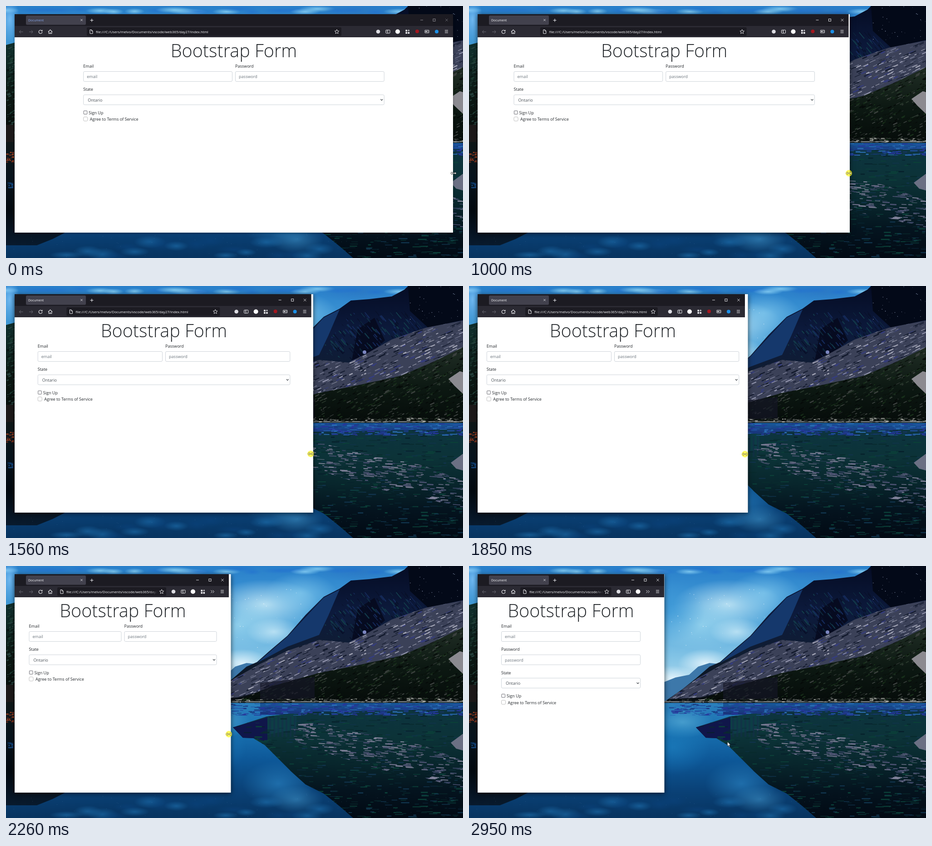
Write an HTML page with a canvas that moves like this. It is 1007 by 556 pixels and loops after 3030 ms.

```html
<!DOCTYPE html>
<html lang="en">
<head>
<meta charset="utf-8">
<title>Responsive form</title>
<style>
html, body { margin: 0; width: 100%; height: 100%; overflow: hidden; background: #0b3a66; }
canvas { display: block; width: 1007px; height: 556px; }
</style>
</head>
<body>
<canvas id="stage" width="1007" height="556"></canvas>
<script>
const W = 1007, H = 556, LOOP = 3030;
const LEFT = 19, TOP = 18, BOTTOM = 500, SCALE = 0.594;
const FONT = '"Open Sans", "Noto Sans", sans-serif';
const URL_TEXT = 'file:///C:/Users/melvo/Documents/vscode/web365/day27/index.html';
let ctx = document.getElementById('stage').getContext('2d');

const TICKS = [[50, 0], [390, 5], [860, 12], [930, 13], [1420, 20], [1490, 21],
  [1990, 28], [2060, 29], [2540, 36], [2750, 39], [2950, 42], [3030, 43]];
// [tick, cursor x, cursor y, toolbar edge, window edge, page edge]
const DRAG = [
  [0, 987, 369, 985, 985, 985],
  [5, 988, 369, 985, 985, 985],
  [9, 960, 369, 969, 972, 971],
  [12, 890, 369, 894, 897, 899],
  [14, 837, 369, 836.5, 839, 841.5],
  [18, 754, 369, 761, 761.5, 765],
  [20, 703, 370, 705, 708, 708],
  [26, 608, 371, 608, 614.5, 615],
  [28, 560, 371, 562, 566, 566],
  [32, 491, 371, 491, 495.5, 496],
  [36, 435, 370, 437, 441, 441],
  [38, 432, 369, 430, 430.5, 430]];

function sample(rows, x) {
  if (x <= rows[0][0]) return rows[0];
  for (let i = 1; i < rows.length; i++) {
    const a = rows[i - 1], b = rows[i];
    if (x < b[0]) {
      const u = (x - a[0]) / (b[0] - a[0]);
      return a.map((v, j) => v + (b[j] - v) * u);
    }
  }
  return rows[rows.length - 1];
}

let seed = 11;
const rand = () => (seed = (seed * 16807) % 2147483647) / 2147483647;

// ---- drawing helpers ----
function path(points, close) {
  ctx.beginPath();
  for (let i = 0; i < points.length; i += 2) ctx.lineTo(points[i], points[i + 1]);
  if (close) ctx.closePath();
}
function poly(points, fill) {
  path(points, true);
  ctx.fillStyle = fill;
  ctx.fill();
}
function line(points, color, width = 1, close = false) {
  path(points, close);
  ctx.strokeStyle = color;
  ctx.lineWidth = width;
  ctx.stroke();
}
function rect(x, y, w, h, fill) {
  ctx.fillStyle = fill;
  ctx.fillRect(x, y, w, h);
}
function box(x, y, w, h, r, fill, stroke, width = 1) {
  ctx.beginPath();
  ctx.roundRect(x, y, w, h, r);
  if (fill) { ctx.fillStyle = fill; ctx.fill(); }
  if (stroke) { ctx.strokeStyle = stroke; ctx.lineWidth = width; ctx.stroke(); }
}
function disc(x, y, r, fill) {
  ctx.beginPath();
  ctx.arc(x, y, r, 0, 7);
  ctx.fillStyle = fill;
  ctx.fill();
}
function text(str, x, y, size, color, weight = 400, align = 'left') {
  ctx.font = `${weight} ${size}px ${FONT}`;
  ctx.textAlign = align;
  ctx.fillStyle = color;
  ctx.fillText(str, x, y);
}
function vertical(y0, y1, ...colors) {
  const g = ctx.createLinearGradient(0, y0, 0, y1);
  colors.forEach((c, i) => g.addColorStop(i / (colors.length - 1), c));
  return g;
}
function puff(x, y, rx, ry, color) {
  ctx.save();
  ctx.translate(x, y);
  ctx.scale(rx, ry);
  const g = ctx.createRadialGradient(0, 0, 0, 0, 0, 1);
  g.addColorStop(0, color);
  g.addColorStop(1, color.slice(0, 7) + '00');
  disc(0, 0, 1, g);
  ctx.restore();
}
// Scatter short strokes inside an outline
function speckle(outline, colors, count, slope, length) {
  const xs = outline.filter((_, i) => i % 2 === 0), ys = outline.filter((_, i) => i % 2);
  const x0 = Math.min(...xs), y0 = Math.min(...ys);
  const w = Math.max(...xs) - x0, h = Math.max(...ys) - y0;
  ctx.save();
  path(outline, true);
  ctx.clip();
  for (let i = 0; i < count; i++) {
    const x = x0 + rand() * w, y = y0 + rand() * h, l = length * (0.4 + rand());
    line([x, y, x + l, y + l * slope], colors[Math.floor(rand() * colors.length)], 0.7 + rand() * 2);
  }
  ctx.restore();
}

// ---- wallpaper ----
function paintSky() {
  rect(0, 0, W, 303, vertical(0, 303, '#287fca', '#479fd8', '#83c4e6', '#c9e6f3'));
  [[570, 85, 120, 55, '#d9f4fbc0'], [510, 130, 110, 55, '#a6def2b0'], [520, 215, 60, 32, '#eefaffd0'],
   [450, 250, 60, 30, '#f2fbffd0'], [650, 60, 80, 45, '#8dd2f2a0'], [590, 145, 60, 30, '#d8f2fbb0'],
   [440, 100, 80, 70, '#3c98d8a0'], [780, 12, 100, 24, '#2a76c4c0']].forEach(p => puff(...p));
  for (let x = 0; x < 880; x += 38)
    puff(x + rand() * 30, 6 + rand() * 8, 22 + rand() * 22, 7, rand() < 0.4 ? '#9fe2fcb0' : '#2372cfb0');
  puff(8, 30, 22, 50, '#7fc4f8d0');
  for (let i = 0; i < 45; i++) disc(440 + rand() * 240, 50 + rand() * 130, 0.3 + rand() * 0.6, '#ffffffb0');
}
function paintMountains() {
  poly([430, 300, 430, 256, 455, 246, 485, 240, 505, 222, 530, 214, 560, 217, 560, 300], '#3d78aa');
  const ridge = [430, 300, 470, 272, 500, 248, 530, 222, 553, 212, 580, 188, 620, 154, 660, 108,
    700, 68, 735, 50, 760, 32, 800, 29, 850, 23, 878, 8, 886, 0, W, 0, W, 303, 430, 303];
  poly(ridge, vertical(0, 300, '#050c24', '#0c1a3c', '#101d31', '#070d12'));
  poly([553, 214, 620, 156, 700, 70, 735, 52, 710, 110, 690, 152, 620, 178], '#15386c');
  poly([886, 0, W, 0, W, 75, 930, 92, 890, 55], '#030918');
  poly([775, 95, 812, 70, 835, 120, 800, 152, 762, 164], '#060b20');
  speckle([690, 145, 760, 60, 870, 50, 930, 92, 760, 165], ['#152a5a', '#081028', '#123a4a'], 240, 1.2, 9);
  for (let i = 0; i < 30; i++) disc(890 + rand() * 117, rand() * 85, 0.35 + rand() * 0.4, '#b9c9e8');
  const rock = [440, 294, 500, 250, 560, 216, 620, 187, 690, 163, 755, 169, 800, 146, 850, 118,
    925, 92, W, 76, W, 142, 930, 178, 870, 205, 780, 222, 680, 242, 590, 270, 510, 290];
  poly(rock, '#3b4158');
  speckle(rock, ['#8d90a8', '#6b7088', '#a6a8b8', '#1a2136', '#10182a', '#343c80', '#4a506a'], 1800, -0.45, 10);
  const slope = [500, 300, 590, 264, 690, 236, 780, 218, 870, 198, 940, 168, W, 135, W, 303, 500, 303];
  poly(slope, vertical(150, 300, '#1d2a22', '#0c1812', '#060c0a'));
  speckle(slope, ['#18301a', '#0a120c', '#27362a', '#050908', '#3c413f'], 1300, -0.5, 7);
  poly([975, 205, 1000, 188, W, 190, W, 238, 988, 220], '#8b8a90');
  poly([560, 258, 680, 245, 680, 292, 560, 296], '#151726b0');
  disc(790, 146, 4, '#7c86c0');
  rect(430, 298, 577, 3, '#6a7074');
  speckle([430, 295, W, 290, W, 301, 430, 301], ['#a0a29c', '#3c4140', '#1a211e'], 300, 0, 6);
}
function paintLake() {
  rect(0, 302, W, 254, vertical(302, 556, '#2b80bc', '#1870b0', '#0d5797', '#0a4278', '#07335f'));
  rect(560, 302, 447, 26, vertical(302, 328, '#175a9a', '#1a2f78'));
  [[470, 345, 70, 35, '#5eb4dca0'], [450, 400, 80, 60, '#1d80c0a0'], [600, 480, 80, 50, '#2a84c4a0'],
   [640, 515, 60, 30, '#3e92c890']].forEach(p => puff(...p));
  for (let x = 130; x < 680; x += 30)
    puff(x + rand() * 25, 512 + rand() * 40, 20 + rand() * 24, 8 + rand() * 8, rand() < 0.6 ? '#1f74b490' : '#0a427c90');
  const mirror = [500, 356, 575, 332, 660, 322, W, 316, W, 556, 765, 556, 735, 530, 700, 502,
    660, 482, 630, 455, 600, 425, 570, 395, 545, 380, 522, 379];
  poly(mirror, vertical(316, 556, '#0d3440', '#0c3338', '#08262c', '#04131e', '#020a14'));
  poly([500, 356, 576, 334, 576, 388, 550, 380, 522, 379], '#10164a');
  poly([576, 332, 640, 324, 640, 360, 576, 372], '#0d3d45');
  for (let i = 0; i < 7; i++) rect(580 + i * 9, 332, 4, 45, '#152f4a90');
  speckle(mirror, ['#0b4038', '#082a2d', '#06202b', '#10334b'], 650, 0, 14);
  const glint = [620, 350, 690, 346, 800, 370, 920, 396, W, 430, W, 492, 930, 470, 830, 450, 730, 420, 640, 388];
  speckle(glint, ['#686b84', '#4c5272', '#80829a', '#0c2b35', '#31405c'], 850, 0.06, 13);
  poly([980, 390, W, 370, W, 407, 992, 403], '#6b7084');
  speckle([440, 303, W, 303, W, 330, 440, 330], ['#2050a0', '#2c70b8', '#183a80', '#27349a'], 420, 0, 12);
}
function paintShore() {
  poly([0, 86, 22, 80, 22, 310, 0, 310], vertical(80, 310, '#10302e', '#0c1914', '#050908'));
  poly([0, 300, 22, 300, 22, 500, 130, 500, 103, 514, 68, 528, 0, 528], vertical(300, 528, '#0e1718', '#07131c', '#03090f', '#081a2d'));
  speckle([0, 88, 20, 84, 20, 300, 0, 300], ['#1c3d32', '#07100e', '#27443f'], 130, -0.4, 6);
  rect(0, 262, 18, 38, '#1c1919');
  speckle([0, 320, 18, 320, 18, 346, 0, 346], ['#b34822', '#6d2c1e', '#2b2020'], 45, 0, 4);
  speckle([0, 388, 16, 388, 16, 402, 0, 402], ['#174f8c', '#0b3158'], 22, 0, 5);
  for (let i = 0; i < 55; i++) disc(rand() * 1000, 502 + rand() * 52, 0.4, '#8fb9dd90');
}
function makeWallpaper() {
  const canvas = document.createElement('canvas'), screen = ctx;
  canvas.width = W;
  canvas.height = H;
  ctx = canvas.getContext('2d');
  paintSky();
  paintMountains();
  paintLake();
  paintShore();
  ctx = screen;
  return canvas;
}

// ---- browser ----
const LIGHT = '#f4f4f8', DIM = '#6b6a74';
function cross(x, y, r, color) {
  line([x - r, y - r, x + r, y + r], color, 0.8);
  line([x - r, y + r, x + r, y - r], color, 0.8);
}
function arrow(x, dir) {
  line([x - 4 * dir, 57, x + 4 * dir, 57], DIM);
  line([x + dir, 53.5, x + 4 * dir, 57, x + dir, 60.5], DIM);
}
const toolIcons = [
  x => disc(x, 56.5, 4.3, '#dcdce2'),
  x => {
    box(x - 4.5, 53, 9, 7, 1, null, LIGHT);
    line([x - 0.5, 53, x - 0.5, 60], LIGHT);
    line([x - 3, 55.5, x - 1.5, 55.5], LIGHT, 0.8);
  },
  x => disc(x, 56.5, 5, '#ffffff'),
  x => {
    [[-4, -4], [-4, 1], [1, 1]].forEach(([dx, dy]) => rect(x + dx, 56.5 + dy, 3.6, 3.6, LIGHT));
    line([x + 2.8, 52, x + 2.8, 56], LIGHT);
    line([x + 0.8, 54, x + 4.8, 54], LIGHT);
  },
  x => disc(x, 56, 4, '#a3161e'),
  x => {
    box(x - 4.5, 53.3, 9, 6, 0.5, null, LIGHT, 0.9);
    rect(x - 3, 55, 3, 2.5, LIGHT);
    line([x + 1, 55.3, x + 3.5, 55.3], LIGHT, 0.7);
    line([x + 1, 57.3, x + 3.5, 57.3], LIGHT, 0.7);
  },
  x => disc(x, 56.5, 4, '#1c8fe6')];

function drawTabs(edge, active) {
  rect(LEFT, TOP, edge - LEFT, 26, '#1c1b22');
  box(44, 21, 132, 20.5, 2.5, '#42414d');
  text('Document', 49, 33.8, 7, active ? '#fbfbfe' : '#86a6ec');
  cross(166.5, 31, 2.2, LIGHT);
  line([185.5, 31.5, 192.5, 31.5], LIGHT);
  line([189, 28, 189, 35], LIGHT);
  const color = active ? LIGHT : '#98979e';
  line([edge - 72, 31, edge - 66, 31], color, 0.9);
  ctx.strokeRect(edge - 44, 28.5, 5, 5);
  cross(edge - 14, 31, 2.8, active ? LIGHT : '#77767e');
}
function drawToolbar(edge) {
  rect(LEFT, 44, edge - LEFT, 25, '#2b2a33');
  arrow(33.5, -1);
  arrow(55, 1);
  ctx.beginPath();
  ctx.arc(76, 57, 3.8, 0.1, 5.4);
  ctx.strokeStyle = LIGHT;
  ctx.lineWidth = 1.1;
  ctx.stroke();
  poly([77, 55.8, 80.4, 55.8, 80.4, 52.2], LIGHT);
  line([93, 57, 97.5, 52.5, 102, 57], LIGHT, 1.1);
  line([94.3, 56.5, 94.3, 60.8, 100.7, 60.8, 100.7, 56.5], LIGHT, 1.1);
  line([97.5, 58, 97.5, 60.5], LIGHT, 1.4);

  const count = edge > 540 ? 7 : edge > 520 ? 5 : edge > 488 ? 4 : 3;
  const slots = count < 7 ? count + 1 : count;
  const slot = i => edge - 14.5 - 21.5 * (slots - i);
  for (let i = 0; i < count; i++) toolIcons[i](slot(i));
  if (count < 7) {
    const x = slot(count);
    [-3.5, 0.5].forEach(d => line([x + d, 53.5, x + d + 3, 56.5, x + d, 59.5], LIGHT));
  }
  [53.5, 56.3, 59.1].forEach(y => line([edge - 18, y, edge - 11, y], LIGHT, 0.9));
  drawAddress(Math.max(113, 178 - (985 - edge) / 7), slot(0) - 11);
}
function drawAddress(left, limit) {
  const right = limit - (left - 108);
  box(left, 47, right - left, 19, 2.5, '#1c1b22');
  const x = left + 7;
  line([x, 52.5, x + 3.5, 52.5, x + 6, 55, x + 6, 60.8, x, 60.8], LIGHT, 1, true);
  line([x + 3.3, 52.5, x + 3.3, 55.3, x + 6, 55.3], LIGHT, 0.8);
  ctx.save();
  ctx.beginPath();
  ctx.rect(left, 47, right - left - 19, 19);
  ctx.clip();
  text(URL_TEXT, left + 20, 59.6, 7.8, '#fbfbfe');
  if (right - left < 285) {
    const g = ctx.createLinearGradient(right - 36, 0, right - 19, 0);
    g.addColorStop(0, '#1c1b2200');
    g.addColorStop(1, '#1c1b22');
    rect(right - 36, 48, 18, 17, g);
  }
  ctx.restore();
  const star = [];
  for (let i = 0; i < 10; i++) {
    const a = i * Math.PI / 5 - Math.PI / 2, r = i % 2 ? 2.3 : 5;
    star.push(right - 10 + r * Math.cos(a), 56.8 + r * Math.sin(a));
  }
  line(star, LIGHT, 0.9, true);
}

// ---- page ----
const INK = '#212529';
function field(label, hint, x, y, w, inset = 8, color = '#6c757d') {
  text(label, x, y + 3, 9.05, INK);
  box(x + 0.5, y + 11.5, w - 1, 22, 2.5, '#fff', '#ced4da');
  text(hint, x + inset, y + 26.3, 9.05, color);
}
function drawForm(edge) {
  const width = edge - LEFT, viewport = width / SCALE;
  const container = viewport >= 1200 ? 1140 : viewport >= 992 ? 960 : viewport >= 768 ? 720 : 540;
  const w = (container - 24) * SCALE + 0.6, x = LEFT + (width - w) / 2, right = x + w;
  text('Bootstrap Form', x + w / 2, 113, 39.5, INK, 300, 'center');
  const stacked = viewport < 768;
  const half = (w - 6) / 2;
  field('Email', 'email', x, 133, stacked ? w : half);
  if (stacked) field('Password', 'password', x, 184.4, w);
  else field('Password', 'password', x + half + 6, 133, half);
  const y = stacked ? 235.8 : 184.4;
  field('State', 'Ontario', x, y, w, 10, '#495057');
  line([right - 8.5, y + 21.3, right - 6, y + 23.8, right - 3.5, y + 21.3], '#343a40', 1.2);
  box(x + 1, y + 46.8, 7.5, 7.5, 0.8, '#fff', '#6a6a72');
  text('Sign Up', x + 12, y + 54.6, 9.05, INK);
  box(x + 0.5, y + 60.4, 9, 9, 2.2, '#fff', '#bfbfbf');
  text('Agree to Terms of Service', x + 14.5, y + 69, 9.05, INK);
}

function drawResizeCursor(x, y, pressed) {
  if (pressed) disc(x, y, 7.2, '#fff61ab0');
  const half = [[-6.5, 0], [-3.2, -3], [-3.2, -1], [3.2, -1], [3.2, -3], [6.5, 0],
    [3.2, 3], [3.2, 1], [-3.2, 1], [-3.2, 3]];
  const points = half.flatMap(([dx, dy]) => [x + dx, y + dy]);
  poly(points, pressed ? '#f7f3a0' : '#ffffff');
  line(points, pressed ? '#77722a' : '#222', 0.8, true);
}
function drawPointer(x, y) {
  const shape = [0, 0, 0, 9.5, 2.2, 7.6, 3.7, 11, 5.2, 10.3, 3.8, 7, 6.7, 6.7];
  const points = shape.map((v, i) => v + (i % 2 ? y : x));
  poly(points, '#fff');
  line(points, '#111', 0.6, true);
}

const wallpaper = makeWallpaper();

function render(time) {
  const tick = time < 50 ? -1 : Math.floor(sample(TICKS, time)[1] + 0.15);
  const [, cx, cy, bar, edge, page] = sample(DRAG, tick);
  const active = tick >= 5;
  ctx.drawImage(wallpaper, 0, 0);
  ctx.save();
  ctx.shadowColor = active ? '#000000a0' : '#00000050';
  ctx.shadowBlur = active ? 10 : 5;
  ctx.shadowOffsetY = 2;
  rect(LEFT, TOP, edge - LEFT, BOTTOM - TOP, '#fff');
  ctx.restore();
  ctx.save();
  ctx.beginPath();
  ctx.rect(LEFT, TOP, edge - LEFT, BOTTOM - TOP);
  ctx.clip();
  drawTabs(bar, active);
  drawToolbar(bar);
  drawForm(page);
  ctx.restore();
  if (tick >= 42) drawPointer(569.5, 388);
  else drawResizeCursor(tick < 0 ? 986 : cx, cy, active && tick < 39);
}
function loop(now) {
  render(now % LOOP);
  requestAnimationFrame(loop);
}
requestAnimationFrame(loop);
</script>
</body>
</html>
```
